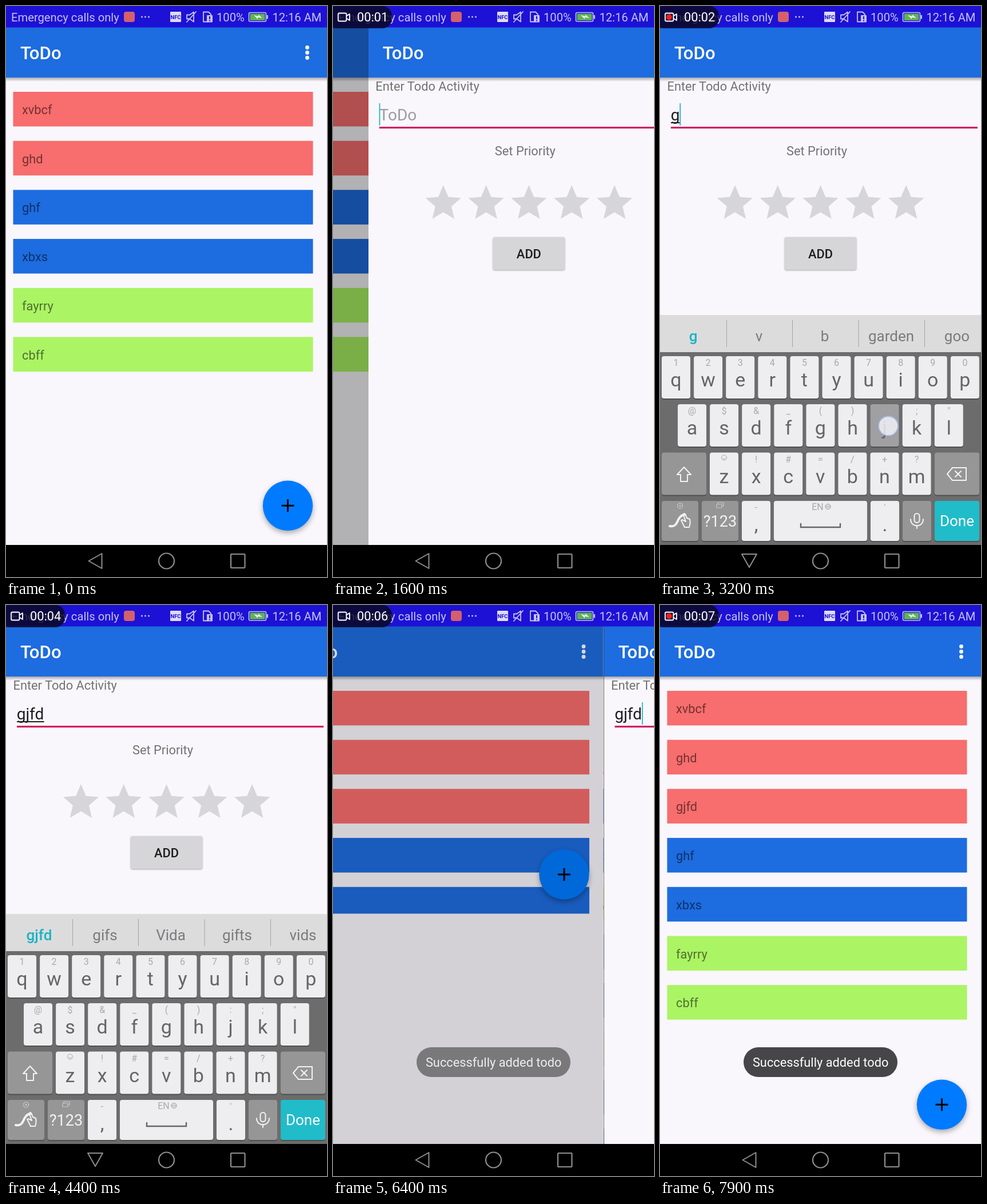
Recreate the animation shown at these times as an HTML page. Size 561x998 px, loop 8000 ms.

```html
<!DOCTYPE html>
<html lang="en">
<head>
<meta charset="utf-8">
<title>ToDo</title>
<style>
html, body { margin: 0; width: 100%; height: 100%; overflow: hidden; background: #000; }
svg { display: block; width: 100vw; height: 100vh; }
text { font-family: Roboto, "Noto Sans", sans-serif; font-size: 21.8px; white-space: pre; }
.mid { text-anchor: middle; }
.title { font-size: 31.2px; font-weight: 500; fill: #fff; }
.soft { fill: #000; fill-opacity: .54; }
.status text { font-size: 20.2px; fill: #c4c3f2; }
.line { fill: none; stroke-width: 2; stroke-linejoin: round; stroke-linecap: round; }
.letter { font-size: 34px; fill: #656466; }
.hint { font-size: 16px; fill: #a9a8aa; }
.word { font-size: 26px; fill: #7b7a7c; }
.word.first { fill: #1cb3c3; }
.fab { filter: drop-shadow(0 4px 5px rgba(0, 0, 0, .32)); }
.button { filter: drop-shadow(0 1.5px 1.5px rgba(0, 0, 0, .35)); }

#list, #page, #keys, #scrim, #toast { animation: 8s linear infinite; }
#list { animation-name: list; }
#page { animation-name: page; }
#scrim { animation-name: scrim; }
#keys { animation-name: keys; }
#toast { animation-name: toast; }

@keyframes list {
  0%, 15.625% { transform: translateX(0); animation-timing-function: cubic-bezier(.3, .4, .8, .9); }
  20% { transform: translateX(-125px); animation-timing-function: ease-out; }
  22.5%, 74.99% { transform: translateX(-140px); }
  75% { transform: translateX(-561px); animation-timing-function: cubic-bezier(.3, .4, .8, .9); }
  80% { transform: translateX(-89px); animation-timing-function: ease-out; }
  83.75%, 100% { transform: translateX(0); }
}
@keyframes page {
  0%, 15.625% { transform: translateX(561px); animation-timing-function: cubic-bezier(.3, .4, .8, .9); }
  20% { transform: translateX(62.4px); animation-timing-function: ease-out; }
  22.5%, 75% { transform: translateX(0); animation-timing-function: cubic-bezier(.3, .4, .8, .9); }
  80% { transform: translateX(473px); animation-timing-function: ease-out; }
  83.75%, 100% { transform: translateX(561px); }
}
@keyframes scrim {
  0%, 15.625% { opacity: 0; }
  20% { opacity: .285; }
  22.5%, 75% { opacity: .32; }
  80% { opacity: .152; }
  83.75%, 100% { opacity: 0; }
}
@keyframes keys {
  0%, 23.75% { transform: translateY(402px); animation-timing-function: ease-out; }
  28%, 72.5% { transform: translateY(0); animation-timing-function: ease-in; }
  76%, 100% { transform: translateY(402px); }
}
@keyframes toast {
  0%, 78.5% { opacity: 0; }
  80% { opacity: .6; }
  81.5%, 97.5% { opacity: 1; }
  98.75% { opacity: .96; }
  100% { opacity: .8; }
}
</style>
</head>
<body>
<svg id="stage" viewBox="0 0 561 998" preserveAspectRatio="none"></svg>
<script>
const stage = document.getElementById('stage');
const $ = id => document.getElementById(id);
const rect = (x, y, w, h, fill, more = '') =>
  `<rect x="${x}" y="${y}" width="${w}" height="${h}" fill="${fill}" ${more}/>`;
const text = (x, y, s, cls = '', more = '') => `<text x="${x}" y="${y}" class="${cls}" ${more}>${s}</text>`;
const line = (d, stroke, more = '') => `<path class="line" d="${d}" stroke="${stroke}" ${more}/>`;
const dot = (x, y, r, fill, more = '') => `<circle cx="${x}" cy="${y}" r="${r}" fill="${fill}" ${more}/>`;

const BLUE = '#1d6ce0', RED = '#f86d6d', GREEN = '#abf464', PAPER = '#f9f7fb', PINK = '#da1a5f', GREY = '#d6d5d8';

const toolbar = x => rect(0, 125, 561, 7, 'url(#shade)') + rect(0, 37, 561, 88, BLUE) + text(x, 93, 'ToDo', 'title');

function rows(items) {
  return items.map(([name, color], i) => {
    const y = 150 + i * 85.7;
    return rect(12.5, y, 524, 60.5, color) + text(28, y + 39, name, 'soft');
  }).join('');
}
const before = [['xvbcf', RED], ['ghd', RED], ['ghf', BLUE], ['xbxs', BLUE], ['fayrry', GREEN], ['cbff', GREEN]];
const after = [...before.slice(0, 2), ['gjfd', RED], ...before.slice(2)];

const listScreen = `<g id="list">
  ${rect(0, 37, 561, 905, PAPER)}
  <g clip-path="url(#fold)"><g id="old">${rows(before)}</g><g id="new">${rows(after)}</g></g>
  ${toolbar(25)}
  ${[72.5, 81.5, 90.5].map(y => dot(526.5, y, 3.4, '#fff')).join('')}
  <g id="fab"><g class="fab">${dot(492.5, 873.3, 43.7, '#007bff')}</g>
    ${line('M481.5 873.3h22M492.5 862.3v22', '#000', 'style="stroke-width:3;stroke-linecap:butt"')}
    ${dot(492.5, 873.3, 43.7, '#222', 'id="press" opacity=".11"')}</g>
  <rect id="scrim" y="37" width="561" height="905"/></g>`;

const starPath = 'M12 17.27L18.18 21l-1.64-7.03L22 9.24l-7.19-.61L12 2 9.19 8.63 2 9.24l5.46 4.73L5.82 21z';
const stars = [0, 1, 2, 3, 4].map(i =>
  `<path class="star" d="${starPath}" transform="translate(${93.6 + 74.8 * i} 306.8) scale(3.11)"/>`).join('');

const pageScreen = `<g id="page">
  ${rect(0, 37, 561, 905, PAPER)}${toolbar(25)}
  ${rect(-1, 37, 1, 905, '#000', 'id="edge"')}
  ${text(12.5, 148, 'Enter Todo Activity', 'soft')}
  <text id="input" x="18.7" y="200" style="font-size:28px"></text>
  ${rect(19, 203, 0, 2, '#222', 'id="compose"')}
  ${rect(19, 211, 536, 3.2, '#d51b60')}
  ${rect(0, 170, 1.8, 39, '#27b4c4', 'id="caret"')}
  ${text(221, 261, 'Set Priority', 'soft')}
  ${stars}
  ${rect(218, 404, 125, 57, GREY, 'rx="3" class="button"')}
  ${text(280.5, 441, 'ADD', 'mid', 'font-weight="500" fill="#1d1c1e"')}</g>`;

function key(x, y, w, label, hint = '', fill = '#eeedef') {
  const h = y > 860 ? 70 : 74, c = x + w / 2;
  return rect(x, y + 2, w, h, '#525152', 'rx="4"') +
    rect(x, y, w, h, fill, `rx="4" data-key="${label}"`) +
    text(c, y + 53, label, 'mid letter') + text(c, y + 17, hint, 'mid hint');
}
const keyRow = (letters, hints, x, y) =>
  [...letters].map((s, i) => key(+(x + 56.1 * i).toFixed(1), y, 50, s, hints[i])).join('');
const DARK = '#979697', PALE = '#f2f1f3';

const keyboard = `<g id="keys">
  ${rect(0, 540, 561, 65, '#dddcdd')}${rect(0, 605, 561, 337, '#6d6c6d')}
  ${[116.5, 231.5, 347, 462.5].map(x => rect(x - .5, 549, 1, 47, '#a3a2a4')).join('')}
  ${[58, 173, 288, 404, 519].map((x, i) => text(x, 586, '', 'mid word' + (i ? '' : ' first'))).join('')}
  ${keyRow('qwertyuiop', '1234567890', 3, 612)}
  ${keyRow('asdfghjkl', '@$&_():;"', 31, 696)}
  ${keyRow('zxcvbnm', ' !#=/+?', 87, 780.5)}
  ${dot(112, 789.5, 4.5, 'none', 'stroke="#a9a8aa"')}${line('M109.5 790.5q2.5 3 5 0', '#a9a8aa', 'style="stroke-width:1"')}
  ${key(3, 780.5, 78, '', '', DARK)}${key(480, 780.5, 78, '', '', DARK)}
  ${line('M42 806l12 13h-6v12h-12v-12h-6z', PALE)}
  ${line('M502 818l9-11h24v22h-24zM516 813l10 10m0-10l-10 10', PALE)}
  ${key(3, 865, 64, '', '', DARK)}${key(73, 865, 64, '', '', DARK)}
  ${key(143, 865, 50, ',', '-')}${key(199, 865, 163, '')}${key(368, 865, 50, '.', "'")}
  ${key(424, 865, 50, '', '', DARK)}${key(480, 865, 78, '', '', '#20bcc9')}
  ${line('M17 909c6 1 10 0 13-7s6-12 13-13', PALE, 'style="stroke-width:4"')}
  ${line('M37 899l6 12h8c2-5 2-9 1-14l-5-2-3-7c-2-2-4 0-3 2l4 11-4-2q-3-2-4 0z', PALE)}
  ${dot(35, 873.5, 4.5, 'none', 'stroke="#c7c6c8" stroke-width="1.5" stroke-dasharray="2.6 1"')}${dot(35, 873.5, 1.5, '#c7c6c8')}
  ${line('M101 871v-3h10v6h-2M99 871h9v6h-9z', '#c7c6c8', 'style="stroke-width:1.2"')}
  ${text(105, 910, '?123', 'mid', `fill="${PALE}" style="font-size:27px"`)}
  ${text(275.5, 881, 'EN', 'mid hint')}
  ${dot(293.5, 875, 4.7, 'none', 'stroke="#a9a8aa"')}${line('M289 875h9M293.5 870.5v9M291 871.5q-1.5 3.5 0 7M296 871.5q1.5 3.5 0 7', '#a9a8aa', 'style="stroke-width:.8"')}
  ${line('M246 905v6h69v-6', '#656466', 'style="stroke-width:2.4;stroke-linejoin:miter"')}
  ${rect(444.5, 887, 9, 16, 'none', `rx="4.5" stroke="${PALE}" stroke-width="2"`)}
  ${line('M438 897c0 15 22 15 22 0M449 908v5', PALE)}
  ${text(519, 909, 'Done', 'mid', 'fill="#fff" style="font-size:26px"')}</g>`;

const toast = `<g id="toast">${rect(146, 773, 269, 52, '#3f3e40', 'rx="26"')}
  ${text(280.7, 807, 'Successfully added todo', 'mid', 'fill="#fff"')}</g>`;

const TINT = '#c4c3f2';
const statusBar = `<g class="status">${rect(0, 0, 561, 37.5, '#1d11d6')}
  ${text(9, 26.5, 'Emergency calls only')}
  ${rect(206, 10, 19, 18, '#d4606c', 'rx="4"')}
  ${[237.5, 243.5, 249.5].map(x => dot(x, 19, 1.5, TINT)).join('')}
  ${rect(287, 10, 19, 18, '#dddcf8', 'rx="1"')}
  ${text(296.5, 22.5, 'NFC', 'mid', 'style="font-size:9.5px;font-weight:700;fill:#1d11d6"')}
  ${line('M316 15.5h5l7-5v17l-7-5h-5zM332 10l-16 18', TINT, 'style="stroke-width:1.8"')}
  ${line('M353 27.5h-8v-17h9l4 4v2', TINT, 'style="stroke-width:1.8"')}
  ${rect(351, 16, 10, 12.5, TINT, 'rx="1"')}${rect(355, 18, 2, 5, '#1d11d6')}${rect(355, 24.5, 2, 2, '#1d11d6')}
  ${text(368, 26.5, '100%')}
  ${rect(424.5, 11.5, 30, 15.5, 'none', `rx="2" stroke="${TINT}" stroke-width="1.6"`)}
  ${rect(426.5, 13.5, 26, 11.5, '#5fb552')}${rect(455.5, 16, 2.5, 6.5, TINT)}
  <path d="M433 16l8 2 0-3 7 6-8-1 0 3z" fill="#eee"/>
  ${text(551.5, 26.5, '12:16 AM', '', 'text-anchor="end"')}
  <g id="badge">${rect(-12, 0, 115, 39, '#080818', 'rx="17" opacity=".8"')}
    ${rect(9, 12.5, 14.5, 14, 'none', 'rx="2" stroke="#fff" stroke-width="1.8"')}
    ${line('M24 17l5-3v11l-5-3', '#fff', 'style="stroke-width:1.8"')}
    ${dot(16, 19.5, 5, '#f4201c', 'id="rec"')}
    <text id="clock" x="42" y="27.3" style="font-size:21.8px;fill:#fff"></text></g></g>`;

const NAV = '#8e8d8e';
const navBar = rect(0, 942, 561, 56, '#000') +
  line('M144.5 970L167.5 957v26z', NAV, 'id="back"') + line('M143 958h26l-13 23z', NAV, 'id="hide"') +
  dot(280.5, 970, 13.5, 'none', `stroke="${NAV}" stroke-width="2.2"`) +
  rect(393, 958, 24.5, 24, 'none', `rx="1" stroke="${NAV}" stroke-width="2.2"`);

const touchMark = `<g id="touch">${dot(0, 0, 19, '#8fa8ee', 'opacity=".3"')}
  ${dot(0, 0, 17, '#f3f4fa', 'stroke="#a9b8e4" stroke-width="1.8"')}</g>`;

stage.innerHTML = `<defs>
  <linearGradient id="shade" x2="0" y2="1"><stop stop-opacity=".32"/><stop offset="1" stop-opacity="0"/></linearGradient>
  <clipPath id="fold"><rect id="foldBox" y="37" width="561"/></clipPath></defs>` +
  listScreen + pageScreen + keyboard + toast + statusBar + navBar + touchMark;

// Touches: start, end, x, y, pressed key
const touches = [
  [900, 1250, 496, 880], [2780, 3000, 283, 737, 'g'], [3080, 3380, 399, 734, 'j'], [3400, 3600, 226, 736, 'f'],
  [3680, 3920, 170, 737, 'd'], [4680, 4920, 356, 348], [5350, 5680, 285, 450]
];
// Typed text and the word suggestions, by start time
const typing = [
  [0, '', ''], [2950, 'g', 'g v b garden goo'], [3350, 'gj', 'gj hi go gif fj'],
  [3600, 'gjf', 'gjf gif gift hid gig'], [3900, 'gjfd', 'gjfd gifs Vida gifts vids']
];
// Recorder clock: when each second and its red dot begin
const ticks = [[100, 400], [1100, 1700], [2100, 2600], [3300, 3500], [4000, 4500], [5000, 5500], [6000, 6500], [7000, 7500]];

const latest = (rows, t) => rows.filter(r => r[0] <= t).pop();
const within = (t, a, b) => t >= a && t < b;
const show = (id, on) => { $(id).style.display = on ? '' : 'none'; };
const words = [...document.querySelectorAll('.word')];
const starNodes = [...document.querySelectorAll('.star')];
const letterKeys = ['g', 'j', 'f', 'd'].map(k => document.querySelector(`[data-key="${k}"]`));

function draw(t) {
  const tick = latest(ticks, t);
  show('badge', tick);
  if (tick) {
    $('clock').textContent = '00:0' + ticks.indexOf(tick);
    show('rec', t >= tick[1]);
  }

  const [, typed, hints] = latest(typing, t);
  const input = $('input');
  input.textContent = typed || 'ToDo';
  input.setAttribute('fill', typed ? '#1d1c1e' : '#9c9b9e');
  const width = typed ? input.getComputedTextLength() : 0;
  $('caret').setAttribute('x', 18.7 + width);
  $('compose').setAttribute('width', t < 6000 ? width : 0);
  show('caret', !within(t, 2100, 2600) && !within(t, 4400, 4900));
  const list = hints.split(' ');
  words.forEach((w, i) => { w.textContent = list[i] || ''; });
  words[0].style.fontWeight = 500;
  starNodes.forEach((s, i) => s.setAttribute('fill', t >= 4800 && i < 4 ? PINK : GREY));

  const touch = touches.find(([a, b]) => within(t, a, b));
  show('touch', touch);
  if (touch) {
    const [a, b, x, y] = touch;
    $('touch').setAttribute('transform', `translate(${x} ${y})`);
    $('touch').setAttribute('opacity', .82 * Math.min(1, (t - a) / 80, (b - t) / 150));
  }
  for (const k of letterKeys)
    k.setAttribute('fill', touch && touch[4] === k.dataset.key ? '#a09fa1' : '#eeedef');
  show('press', within(t, 950, 1500));

  // The list keeps its short layout until the keyboard space is given back.
  const folded = within(t, 6000, 6650);
  $('foldBox').setAttribute('height', folded ? 502.5 : 905);
  $('fab').setAttribute('transform', `translate(0 ${folded ? -402.3 : 0})`);
  show('edge', folded);
  show('old', t < 6000);
  show('new', t >= 6000);

  const open = within(t, 2000, 6050);
  show('back', !open);
  show('hide', open);
}

let start;
function frame(now) {
  start ??= now;
  draw((now - start) % 8000);
  requestAnimationFrame(frame);
}
draw(0);
requestAnimationFrame(frame);
</script>
</body>
</html>
```
